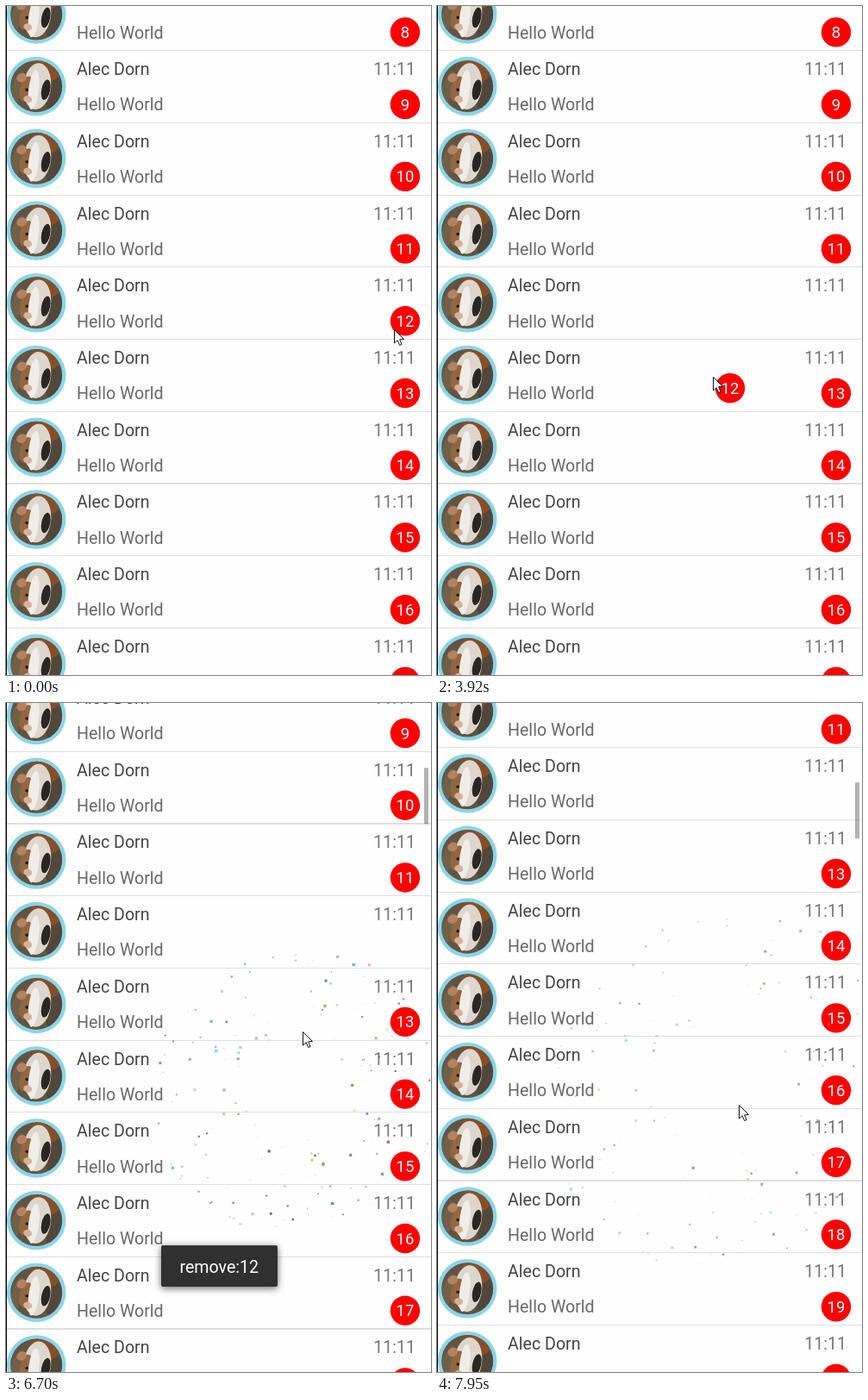
An HTML page with a canvas that plays this animation: 493 px wide and 776 px high, repeating every 8000 ms.

```html
<!DOCTYPE html>
<html lang="en">
<head>
<meta charset="utf-8">
<title>Drag a badge away</title>
<style>
html, body { margin: 0; width: 100%; height: 100%; overflow: hidden; background: #fefefe; }
canvas { display: block; }
</style>
</head>
<body>
<canvas id="stage" width="493" height="776"></canvas>
<script>
const W = 493, H = 776, LOOP = 8000;
const ctx = document.getElementById('stage').getContext('2d');
const FONT = 'Roboto, "Noto Sans", sans-serif';
const NAME = 'Alec Dorn';
const RED = '#f00', PITCH = 83.72, R = 17.2;
const HOME = { x: 463, y: 365.3 };
const BURST = { x: 335, y: 448 };
const GRAB = 800, RELEASE = 4200, POP = 4370;

// [time, x, y] stops, joined by straight motion
const pointer = [
  [0, 450, 375], [90, 450, 375], [180, 460, 367], [370, 460, 367], [460, 459, 368],
  [760, 459, 368], [840, 458, 371], [1200, 458, 371], [1570, 441, 377], [1900, 441, 377],
  [2490, 385, 391], [2770, 385, 391], [2860, 382, 391], [3650, 337, 414], [4000, 315, 435],
  [4200, 315, 435], [4460, 425, 468], [4730, 429, 473], [5380, 429, 473], [5890, 353, 475],
  [6700, 344, 381], [7230, 332, 299], [7420, 328, 270], [7560, 328, 270], [7950, 350, 466]
];
const scrolling = [[0, 0], [5940, 0], [6700, 79], [7230, 149], [7450, 184], [7950, 251.1]];
const toastFade = [[0, 0], [4370, 0], [4620, 1], [7170, 1], [7670, 0]];

function at(stops, t) {
  const i = stops.findIndex(s => s[0] > t);
  if (i < 0) return stops[stops.length - 1].slice(1);
  const a = stops[i - 1], b = stops[i];
  const k = (t - a[0]) / (b[0] - a[0]);
  return a.slice(1).map((v, j) => v + (b[j + 1] - v) * k);
}

let seed = 12;
function rand() {
  seed = (seed * 16807) % 2147483647;
  return seed / 2147483647;
}
const sparks = Array.from({ length: 165 }, () => {
  const angle = rand() * Math.PI * 2, reach = 0.36 + 0.66 * rand() ** 0.7;
  const channel = () => Math.round(40 + 190 * rand());
  return {
    x: Math.cos(angle) * reach,
    y: Math.sin(angle) * reach,
    size: 0.7 + 3.3 * rand() ** 1.4,
    color: `rgb(${channel()},${channel()},${channel()})`
  };
});

function disc(x, y, r, color) {
  ctx.fillStyle = color;
  ctx.beginPath();
  ctx.arc(x, y, r, 0, 7);
  ctx.fill();
}

function blob(x, y, rx, ry, turn, color) {
  ctx.fillStyle = color;
  ctx.beginPath();
  ctx.ellipse(x, y, rx, ry, turn, 0, 7);
  ctx.fill();
}

function polygon(points, color) {
  ctx.fillStyle = color;
  ctx.beginPath();
  points.forEach(([x, y]) => ctx.lineTo(x, y));
  ctx.closePath();
  ctx.fill();
}

function text(str, x, y, size, color, align = 'left') {
  ctx.font = `${size}px ${FONT}`;
  ctx.textAlign = align;
  ctx.fillStyle = color;
  ctx.fillText(str, x, y);
}

function avatar(x, y) {
  ctx.save();
  ctx.translate(x, y);
  disc(0, 0, 34.3, '#8ad5e8');
  ctx.beginPath();
  ctx.arc(0, 0, 30, 0, 7);
  ctx.clip();
  disc(0, 0, 31, '#615443');
  blob(20, 8, 9, 20, 0.2, '#51473a');
  blob(-22, 2, 7, 20, 0.3, '#6f604a');
  blob(10, -19, 17, 13, 0.3, '#854f29');
  blob(1, 0, 16, 27, 0.1, '#dcd6cd');
  blob(-12, 3, 7, 15, 0.25, '#94663f');
  blob(-17, -10, 6, 5, -0.5, '#b58261');
  blob(11, 4, 5, 12, 0.2, '#292624');
  blob(-3, 4, 6, 23, 0.12, '#f0ede8');
  blob(-10, 15, 5, 4, 0.3, '#d6b29c');
  disc(-11, 4, 1.8, '#241a14');
  ctx.restore();
}

function badge(n, x, y) {
  disc(x, y, R, RED);
  text(n, x, y + 6.6, 18.5, '#fff', 'center');
}

function divider(y) {
  const top = Math.floor(y), part = y - top;
  ctx.fillStyle = '#dfdfdf';
  if (part > 0.5 && part < 0.7) ctx.fillRect(1, top, W, 2);
  else ctx.fillRect(1, Math.round(y), W, 1);
}

function list(t, offset) {
  for (let n = 7; n < 22; n++) {
    const y = HOME.y + (n - 12) * PITCH - offset;
    if (y < -60 || y > H + 60) continue;
    avatar(35.2, y - 21);
    text(NAME, 82, y - 34, 19.6, '#444');
    text('Hello World', 82, y + 7.2, 19.6, '#686868');
    text('11:11', 475, y - 34, 19.6, '#777', 'right');
    if (n !== 12 || t < GRAB) badge(n, HOME.x, y);
    divider(y + 20.85);
  }
  if (offset > 0) {
    ctx.fillStyle = 'rgba(0,0,0,.3)';
    ctx.fillRect(485, 67.5 + offset * 0.098, 5, 65);
  }
}

function draggedBadge(t) {
  if (t < GRAB || t >= POP) return;
  const [px, py] = at(pointer, Math.min(t, RELEASE));
  const x = px + 20, y = py + 13;
  const dx = x - HOME.x, dy = y - HOME.y, d = Math.hypot(dx, dy);
  if (d < 95) {
    // the tether thins as it stretches
    const r = Math.max(3, R * (1 - d / 90)), nx = -dy / d, ny = dx / d;
    const a = r * 0.4, b = r * 1.1;
    disc(HOME.x, HOME.y, r, RED);
    polygon([
      [HOME.x + nx * a, HOME.y + ny * a], [x + nx * b, y + ny * b],
      [x - nx * b, y - ny * b], [HOME.x - nx * a, HOME.y - ny * a]
    ], RED);
  }
  badge(12, x, y);
}

function toast(t) {
  const alpha = at(toastFade, t)[0];
  if (alpha <= 0) return;
  ctx.save();
  ctx.globalAlpha = alpha;
  ctx.shadowColor = 'rgba(0,0,0,.6)';
  ctx.shadowBlur = 8;
  ctx.shadowOffsetY = 2;
  ctx.fillStyle = '#303030';
  ctx.beginPath();
  ctx.roundRect(180, 629, 135, 48, 2);
  ctx.fill();
  ctx.shadowColor = 'transparent';
  ctx.fillStyle = '#464646';
  ctx.fillRect(181, 629, 133, 1);
  text('remove:12', 247.3, 661, 19.6, '#fff', 'center');
  ctx.restore();
}

function burst(t) {
  if (t < POP) return;
  const u = (t - 4730) / 1000;
  const spread = 40 + 80.8 * u - 8.7 * u * u;
  ctx.save();
  ctx.globalAlpha = Math.min(1, 1 - 0.14 * u);
  for (const s of sparks) {
    const size = s.size * (1 - 0.07 * u);
    ctx.fillStyle = s.color;
    ctx.fillRect(BURST.x + s.x * spread - size / 2, BURST.y + s.y * spread - size / 2, size, size);
  }
  ctx.restore();
}

function cursor(t) {
  const [x, y] = at(pointer, t);
  ctx.save();
  ctx.translate(Math.round(x) + 0.5, Math.round(y) + 0.5);
  polygon([[0, 0], [0, 15.5], [3.6, 12.3], [6.2, 18], [8.6, 17], [6.2, 11.3], [11, 11]], '#fff');
  ctx.strokeStyle = '#111';
  ctx.lineWidth = 1;
  ctx.stroke();
  ctx.restore();
}

function draw() {
  const t = performance.now() % LOOP;
  ctx.fillStyle = '#fefefe';
  ctx.fillRect(0, 0, W, H);
  list(t, at(scrolling, t)[0]);
  ctx.fillStyle = '#000';
  ctx.fillRect(0, 0, 1, H);
  draggedBadge(t);
  toast(t);
  burst(t);
  cursor(t);
  requestAnimationFrame(draw);
}
draw();
</script>
</body>
</html>
```
